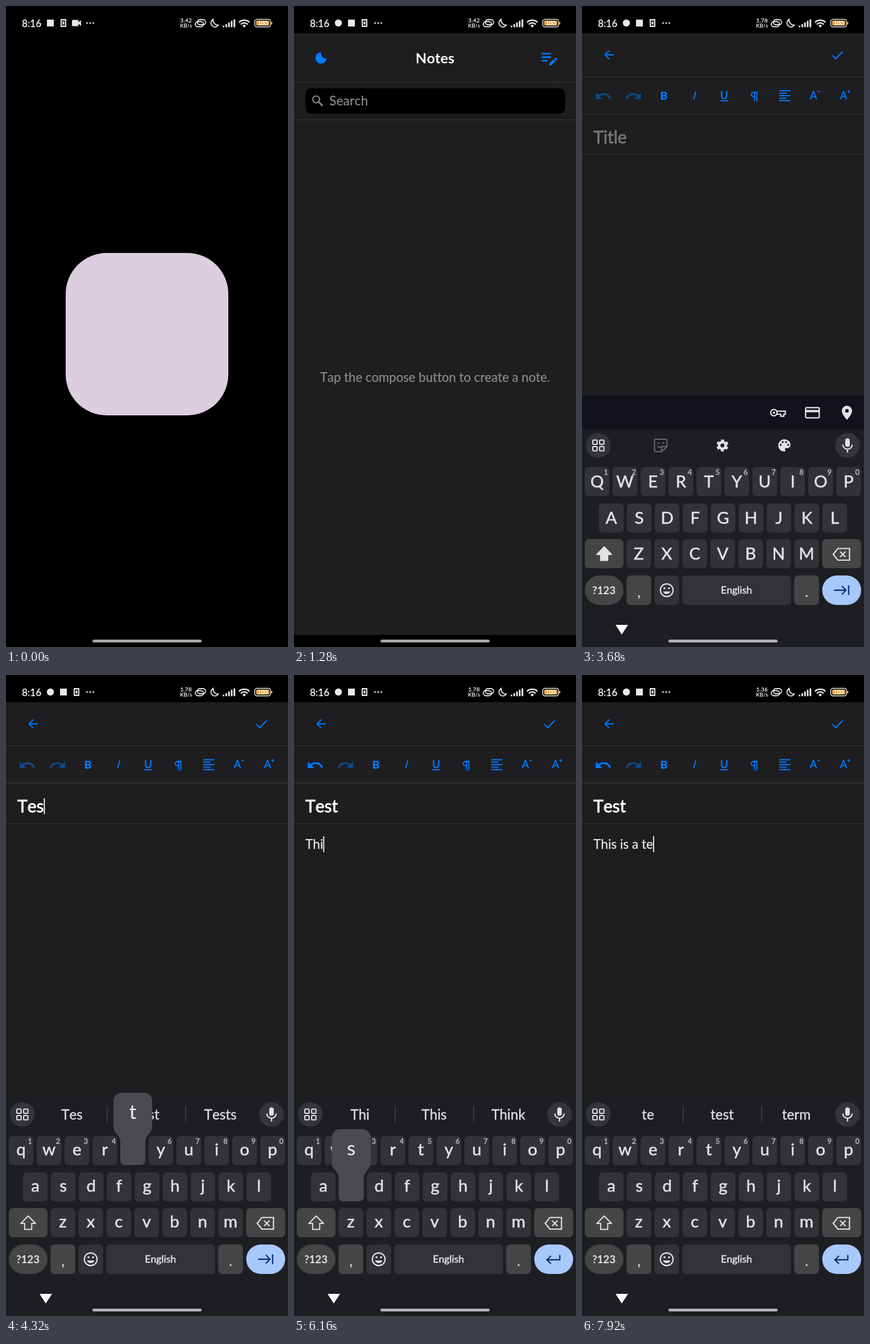
Animation, 496 px wide and 1129 px high, one loop 8 s. Source, as an HTML page:

```html
<!DOCTYPE html>
<html lang="en">
<head>
<meta charset="utf-8">
<title>Notes</title>
<style>
html, body { margin: 0; width: 100%; height: 100%; overflow: hidden; background: #000; }
svg { display: block; width: 496px; height: 1129px; }
text {
  font-family: Lato, "Noto Sans", sans-serif; white-space: pre;
  font-kerning: none; font-variant-ligatures: none;
}
.mid { text-anchor: middle; }
.line { fill: none; stroke-linecap: butt; stroke-linejoin: miter; }
</style>
</head>
<body>
<svg id="stage" viewBox="0 0 496 1129" xmlns="http://www.w3.org/2000/svg"></svg>
<script>
const LOOP = 8000, TICK = 80;
const PAGE = '#1e1e20', BLUE = '#007aff', DIM = '#0c4a88', GREY = '#8a8a8d', FAINT = '#777779';
const BOARD = '#1d1e22', KEY = '#323337', SPECIAL = '#444645', INK = '#e3e3e5', PRESS = '#4a4b50';
const ENTER = '#a8c7fa', NAVY = '#0a3470';

// Markup helpers
const rect = (x, y, w, h, fill, r = 0, more = '') =>
  `<rect x="${x}" y="${y}" width="${w}" height="${h}" rx="${r}" fill="${fill}" ${more}/>`;
const disc = (x, y, r, fill, more = '') => `<circle cx="${x}" cy="${y}" r="${r}" fill="${fill}" ${more}/>`;
const line = (d, color, w = 2, more = '') => `<path class="line" d="${d}" stroke="${color}" stroke-width="${w}" ${more}/>`;
const shape = (d, fill, more = '') => `<path d="${d}" fill="${fill}" ${more}/>`;
const text = (x, y, s, size, fill, more = '') =>
  `<text x="${x}" y="${y}" font-size="${size}" fill="${fill}" ${more}>${s}</text>`;
const group = (id, body, more = '') => `<g id="${id}" ${more}>${body}</g>`;
const heavier = (color, w = .5) => `stroke="${color}" stroke-width="${w}"`;
const rule = y => rect(0, y, 496, 1, '#38383b');

const phone = x => rect(x - 5, 23, 10, 14, '#e8e8e8', 1) + rect(x - 3, 25.5, 6, 9, '#000')
  + rect(x - 1.8, 27.5, 3.6, 5, '#e8e8e8');

function statusBar() {
  const c = '#e8e8e8';
  const bars = [3, 5.5, 8.5, 11.5, 14].map((h, i) => rect(381 + i * 4.8, 37.5 - h, 3, h, c, 1)).join('');
  return rect(0, 0, 496, 48, '#000')
    + text(28, 36.5, '8:16', 17.2, '#f0f0f0', heavier('#f0f0f0', .4))
    + group('iconsA', rect(72, 24, 12, 12, c) + phone(101)
      + rect(116, 24.5, 11.5, 11, c, 1.5) + shape('M127 29l5-4v10l-5-4z', c))
    + group('iconsB', disc(78, 30, 6.2, c) + rect(95, 24, 12, 12, c) + phone(124))
    + [142.5, 148, 153.5].map(x => disc(x, 30, 1.5, c)).join('')
    + text(316.5, 29, '3.42', 10.3, c, 'id="speed" class="mid" font-weight="700"')
    + text(316.5, 38, 'KB/s', 9.4, c, 'class="mid" font-weight="700"')
    + rect(336.5, 24, 14.5, 9, 'none', 4.5, `stroke="${c}" stroke-width="1.8"`)
    + rect(332.9, 27.5, 14.5, 9, 'none', 4.5, `stroke="${c}" stroke-width="1.8"`)
    + line('M364.5 23.6a7 7 0 1 0 9 10a8.5 8.5 0 0 1-9-10z', c, 1.8)
    + bars
    + line('M409.8 28.8a13 13 0 0 1 18.4 0M413 32.3a8.4 8.4 0 0 1 12 0', c, 2.5)
    + shape('M419 38l-3.2-3.6a4.8 4.8 0 0 1 6.4 0z', c)
    + rect(437.4, 23.6, 28, 13.2, 'none', 4, `stroke="${c}" stroke-width="1.5"`)
    + rect(439.6, 25.8, 23.6, 8.8, '#dfa043', 2) + rect(466.6, 28, 1.6, 4.5, c, .8)
    + text(451.3, 34, '100', 10.5, '#fff', 'class="mid" font-weight="700"');
}

function notesPage() {
  return rect(0, 48, 496, 1060, PAGE) + rule(134) + rule(200)
    + shape('M47.5 81.5a10 10 0 1 0 10 11a9.500 9.500 0 0 1-10-11z', BLUE)
    + text(248, 100.5, 'Notes', 25.4, '#fff', 'class="mid" font-weight="700"')
    + line('M435.5 84h16.5M435.5 90.2h16.5M435.5 96.4h10.5', BLUE, 2.7)
    + shape('M449 101.5l7.7-7.7 3.2 3.2-7.7 7.7h-3.2zM457.7 92.8l1.6-1.6q.8-.8 1.6 0l1.7 1.7q.8.8 0 1.6l-1.6 1.6z', BLUE)
    + rect(20, 145, 457, 45, '#000', 11)
    + disc(39, 164.5, 6, 'none', `stroke="${GREY}" stroke-width="2.1"`) + line('M43.3 168.8l7.2 7.2', GREY, 2.6)
    + text(62, 175, 'Search', 23, GREY, heavier(GREY, .25))
    + text(248, 662, 'Tap the compose button to create a note.', 22.2, GREY, `class="mid" ${heavier(GREY, .25)}`);
}

function editorPage() {
  const undo = 'M12.5 8c-2.65 0-5.05.99-6.9 2.6L2 7v9h9l-3.62-3.62c1.39-1.16 3.16-1.88 5.12-1.88 3.54 0 6.55 2.31 7.6 5.5l2.37-.78C21.08 11.03 17.15 8 12.5 8z';
  return rect(0, 48, 496, 1060, PAGE) + rule(124) + rule(190) + rule(261)
    + line('M56 86H41M48 78.5l-7.5 7.5 7.5 7.5', BLUE, 2)
    + line('M440.5 87l5.8 5.8 12-12.3', BLUE, 2.1)
    + shape(undo, DIM, 'id="undo" transform="translate(21.5 143)scale(1.32)"')
    + shape(undo, DIM, 'transform="translate(106.500 143)scale(-1.32 1.32)"')
    + text(144, 164.5, 'B', 19.5, BLUE, 'class="mid" font-weight="900"')
    + line('M196.3 164.5l4-14', BLUE, 2)
    + text(250, 163.5, 'U', 18.5, BLUE, `class="mid" ${heavier(BLUE)}`) + rect(243.5, 166, 13.5, 2, BLUE)
    + line('M309 152h-7a4 4 0 0 0 0 8h1M303.5 152v16M307.5 152v16', BLUE, 1.9)
    + line('M347 149.2h19.5M347 153.6h13M347 158h19.5M347 162.4h13M347 166.8h19.5', BLUE, 2)
    + [407, 460].map(x => text(x, 163.5, 'A', 18.5, BLUE, `class="mid" ${heavier(BLUE, .4)}`)).join('')
    + line('M414 150.5h5M466.5 150.5h5M469 148v5', BLUE, 1.6)
    + text(20, 242, 'Title', 30, FAINT, `id="title" ${heavier(FAINT, .8)}`)
    + text(20, 305.5, '', 22.6, '#ededed', `id="body" ${heavier('#ededed', .25)}`)
    + rect(0, 0, 1.8, 28, '#fff', 0, 'id="caret"');
}

// Key centres: [x, row top]
const spots = {};
[['qwertyuiop', 26.5, 812], ['asdfghjkl', 51.5, 876], ['zxcvbnm', 100, 939]].forEach(([row, x, y]) =>
  [...row].forEach((c, i) => spots[c] = [x + i * 49.15, y]));

function toolIcons() {
  const off = '#6a6b6f', hub = `stroke="${INK}"`;
  return line('M140 785h-9.5q-3 0-3-3v-16q0-3 3-3h16q3 0 3 3v10zM140 785v-9h9.5', off, 2)
    + disc(134.5, 770, 1.5, off) + line('M141 769.5h4M133 775q4 5 8 0', off, 2)
    + disc(247, 774, 5.8, 'none', hub + ' stroke-width="4.6"')
    + disc(247, 774, 8.9, 'none', hub + ' stroke-width="3.4" stroke-dasharray="5.2 4.12" stroke-dashoffset="2.6" transform="rotate(30 247 774)"')
    + shape('M12 3c-4.97 0-9 4.03-9 9s4.03 9 9 9c.83 0 1.5-.67 1.5-1.5 0-.39-.15-.74-.39-1.01-.23-.26-.38-.61-.38-.99 0-.83.67-1.5 1.5-1.5H16c2.76 0 5-2.24 5-5 0-4.42-4.03-8-9-8z', INK, 'transform="translate(341.6 759.6)scale(1.2)"')
    + [[349.5, 773], [353, 768], [359, 768], [362.7, 773]].map(p => disc(...p, 1.8, BOARD)).join('');
}

function keyboard() {
  const letters = Object.entries(spots).map(([c, [x, y]]) =>
    rect(x - 21.7, y, 43.4, 51.3, KEY, 7)
    + text(x, y + 35, c, 29.5, INK, `class="mid" data-key="${c}" ${heavier(INK, .6)}`)).join('');
  const hints = [...'1234567890'].map((n, i) =>
    text(42 + i * 49.15, 825.5, n, 13, '#bcbcbf', 'class="mid" font-weight="700"')).join('');
  const cells = [19, 31].map(x => [764.5, 776].map(y =>
    rect(x, y, 7.6, 7.6, 'none', 1.5, `stroke="${INK}" stroke-width="2"`)).join('')).join('');
  return rect(0, 746, 496, 383, BOARD)
    + disc(28.7, 774, 21.7, '#34353a') + cells
    + disc(467, 774, 21.7, '#34353a') + rect(463, 761.5, 8, 15, INK, 4)
    + line('M458.8 772.5a8.2 8.2 0 0 0 16.4 0M467 780.5v6', INK, 2.2)
    + group('tools', toolIcons())
    + group('strip', [116, 246.5, 377].map(x => text(x, 782.5, '', 24.3, INK, `class="mid word" ${heavier(INK, .35)}`)).join('')
      + rect(177.5, 759, 1, 30, '#505155') + rect(315.5, 759, 1, 30, '#505155'))
    + letters + hints
    + rect(5, 939, 68, 51.3, SPECIAL, 7)
    + shape('M39 952.8l12.8 13.2h-6.6v10.5h-12.4V966h-6.6z', INK, `id="shift" stroke="${INK}" stroke-width="2" stroke-linejoin="round"`)
    + rect(422.5, 939, 68.5, 51.3, SPECIAL, 7)
    + line('M450 955.5h20.5v20.5h-20.5l-8.2-10.2zM454 961l9.5 9.5M463.5 961l-9.5 9.5', INK, 2.2)
    + rect(5, 1003, 68, 52, SPECIAL, 26)
    + text(38.5, 1035.5, '?123', 18.7, INK, 'class="mid" font-weight="700"')
    + rect(78.3, 1003, 43.4, 52, SPECIAL, 7) + text(100, 1041, ',', 27, INK, 'class="mid"')
    + rect(127.4, 1003, 43.4, 52, KEY, 7)
    + disc(149, 1029, 11.2, 'none', `stroke="${INK}" stroke-width="2.2"`)
    + disc(145, 1025.5, 1.8, INK) + disc(153, 1025.5, 1.8, INK) + shape('M142.5 1031.2h13a7 7 0 0 1-13 0z', INK)
    + rect(176.3, 1003, 191.4, 52, KEY, 7, 'id="space"')
    + text(271.7, 1035.3, 'English', 17.6, INK, `class="mid" ${heavier(INK, .5)}`)
    + rect(373.3, 1003, 43.4, 52, SPECIAL, 7) + text(395, 1041, '.', 27, INK, 'class="mid"')
    + rect(422.5, 1003, 68.5, 52, ENTER, 26, 'id="enter"')
    + line('M443.5 1029h20M457 1021.5l7.3 7.5-7.3 7.5M469 1020.5v17', NAVY, 2.3, 'id="nextIcon"')
    + line('M467.5 1021.5v8.5h-22M452 1023l-7.2 7 7.2 7', NAVY, 2.3, 'id="returnIcon"')
    + group('popup', shape('M-34-62a14 14 0 0 1 14-14h40a14 14 0 0 1 14 14v44c0 14-12 16-12 28v33a8 8 0 0 1-8 8h-28a8 8 0 0 1-8-8v-33c0-12-12-14-12-28z', PRESS)
      + text(0, -30, '', 35, '#f2f2f2', 'id="popupText" class="mid"'));
}

function autofill() {
  return rect(0, 686, 496, 60, '#11121a')
    + disc(337.5, 716.3, 5.6, 'none', `stroke="${INK}" stroke-width="2.2"`) + disc(337.5, 716.3, 2, INK)
    + line('M342.5 713.6h15.2v5.4h-2.7v3.6h-5.5v-3.6h-7', INK, 2.2)
    + rect(393.3, 707.3, 24, 18, 'none', 2, `stroke="${INK}" stroke-width="2.3"`) + rect(393, 711.5, 25, 4, INK)
    + shape('M466 729c-5-6.2-9-11-9-16a9 9 0 0 1 18 0c0 5-4 9.8-9 16z', INK) + disc(466, 713, 3.2, '#11121a');
}

const stage = document.getElementById('stage');
stage.innerHTML = group('notes', notesPage()) + group('editor', editorPage())
  + group('splash', rect(0, 48, 496, 1081, '#000') + rect(105, 435, 286, 286, '#dccede', 72))
  + rect(0, 1108, 496, 21, '#000')
  + group('autofill', autofill()) + group('board', keyboard())
  + shape('M59 1090h22l-11 17z', '#fff', 'id="hide"')
  + rect(152, 1116, 192, 5, '#fff', 2.5, 'opacity=".66"') + statusBar();

const el = {};
stage.querySelectorAll('[id]').forEach(n => el[n.id] = n);
const keyLabels = [...stage.querySelectorAll('[data-key]')];
const words = [...stage.querySelectorAll('.word')];

// Typing: [time, title, body, pressed key, suggestions]
const steps = [
  [0, '', '', '', ''],
  [3920, '', '', 't', ''],
  [4000, 'T', '', '', 'The This To'],
  [4080, 'T', '', 'e', 'The This To'],
  [4160, 'Te', '', '', 'Te Test Tell'],
  [4240, 'Te', '', 's', 'Te Test Tell'],
  [4320, 'Tes', '', 't', 'Tes Test Tests'],
  [4400, 'Test', '', '', 'Tests Test Testing'],
  [4960, 'Test', '', 'enter', 'Tests Test Testing'],
  [5040, 'Test', '', '', ''],
  [5520, 'Test', '', 't', ''],
  [5600, 'Test', 'T', '', 'The This To'],
  [5680, 'Test', 'T', 'h', 'The This To'],
  [5760, 'Test', 'Th', '', 'Th The This'],
  [6000, 'Test', 'Th', 'i', 'Th The This'],
  [6080, 'Test', 'Thi', '', 'Thi This Think'],
  [6160, 'Test', 'Thi', 's', 'Thi This Think'],
  [6240, 'Test', 'This', '', 'Thus This These'],
  [6400, 'Test', 'This', 'space', 'Thus This These'],
  [6480, 'Test', 'This ', '', 'witch is song'],
  [6800, 'Test', 'This ', 'i', 'witch is song'],
  [6960, 'Test', 'This i', '', 'in is it'],
  [7040, 'Test', 'This i', 's', 'in is it'],
  [7120, 'Test', 'This is', 'space', 'its is isn’t'],
  [7200, 'Test', 'This is ', '', 'the a my'],
  [7360, 'Test', 'This is ', 'a', 'the a my'],
  [7440, 'Test', 'This is a ', '', 'good great new'],
  [7600, 'Test', 'This is a ', 't', 'good great new'],
  [7680, 'Test', 'This is a t', '', 't the to'],
  [7840, 'Test', 'This is a t', 'e', 't the to'],
  [7920, 'Test', 'This is a te', '', 'te test term']
];

const clamp = v => Math.max(0, Math.min(1, v));
const show = (node, on) => node.style.display = on ? '' : 'none';
const move = (node, x, y) => node.setAttribute('transform', `translate(${x} ${y})`);
const write = (node, s) => { if (node.textContent !== s) node.textContent = s; };

function drawTyping(t) {
  const [, title, body, key, hint] = steps.filter(s => s[0] <= t).pop();
  const inBody = t >= 5040;
  const typed = inBody ? body : title;
  const caps = !typed;
  const cased = c => caps ? c.toUpperCase() : c;

  write(el.title, title || 'Title');
  const tone = title ? '#fff' : FAINT;
  el.title.setAttribute('fill', tone);
  el.title.setAttribute('stroke', tone);
  write(el.body, body);
  el.undo.setAttribute('fill', body ? BLUE : DIM);

  const field = inBody ? el.body : el.title;
  const width = typed ? field.getComputedTextLength() : 0;
  show(el.caret, typed || inBody && t < 5440);
  move(el.caret, 20 + width, inBody ? 284 : 217);

  keyLabels.forEach(n => {
    const c = n.dataset.key;
    write(n, cased(c));
    n.setAttribute('y', spots[c][1] + (caps ? 36 : 34));
  });
  el.shift.setAttribute('fill', caps ? INK : 'none');
  el.space.setAttribute('fill', key === 'space' ? PRESS : KEY);
  el.enter.setAttribute('fill', key === 'enter' ? '#c6dafc' : ENTER);
  show(el.nextIcon, !inBody);
  show(el.returnIcon, inBody);

  const list = hint.split(' ');
  words.forEach((n, i) => write(n, list[i] || ''));
  show(el.strip, hint);
  show(el.tools, !hint);

  const spot = spots[key];
  show(el.popup, spot);
  if (spot) {
    move(el.popup, ...spot);
    write(el.popupText, cased(key));
  }
}

function render(t) {
  const editing = t >= 2880;
  show(el.iconsA, t < 1120);
  show(el.iconsB, t >= 1120);
  write(el.speed, t < 2560 ? '3.42' : t < 6640 ? '1.78' : '1.36');

  el.splash.style.opacity = 1 - clamp((t - 880) / 400);
  show(el.splash, t < 1280);
  show(el.notes, !editing);
  show(el.editor, editing);
  move(el.editor, t < 3360 ? -38 * 3 ** ((3040 - t) / 80) : 0, 0);
  show(el.hide, t >= 2960);

  const rise = clamp((t - 3040) / 400);
  show(el.board, rise > 0);
  move(el.board, 0, 383 * (1 - rise) ** 3);
  show(el.autofill, t >= 3600 && t < 4000);
  el.autofill.style.opacity = clamp((t - 3520) / 160);
  drawTyping(t);
}

const start = performance.now();
function loop() {
  const t = (performance.now() - start) % LOOP;
  render(Math.floor(t / TICK) * TICK);
  requestAnimationFrame(loop);
}
loop();
</script>
</body>
</html>
```
